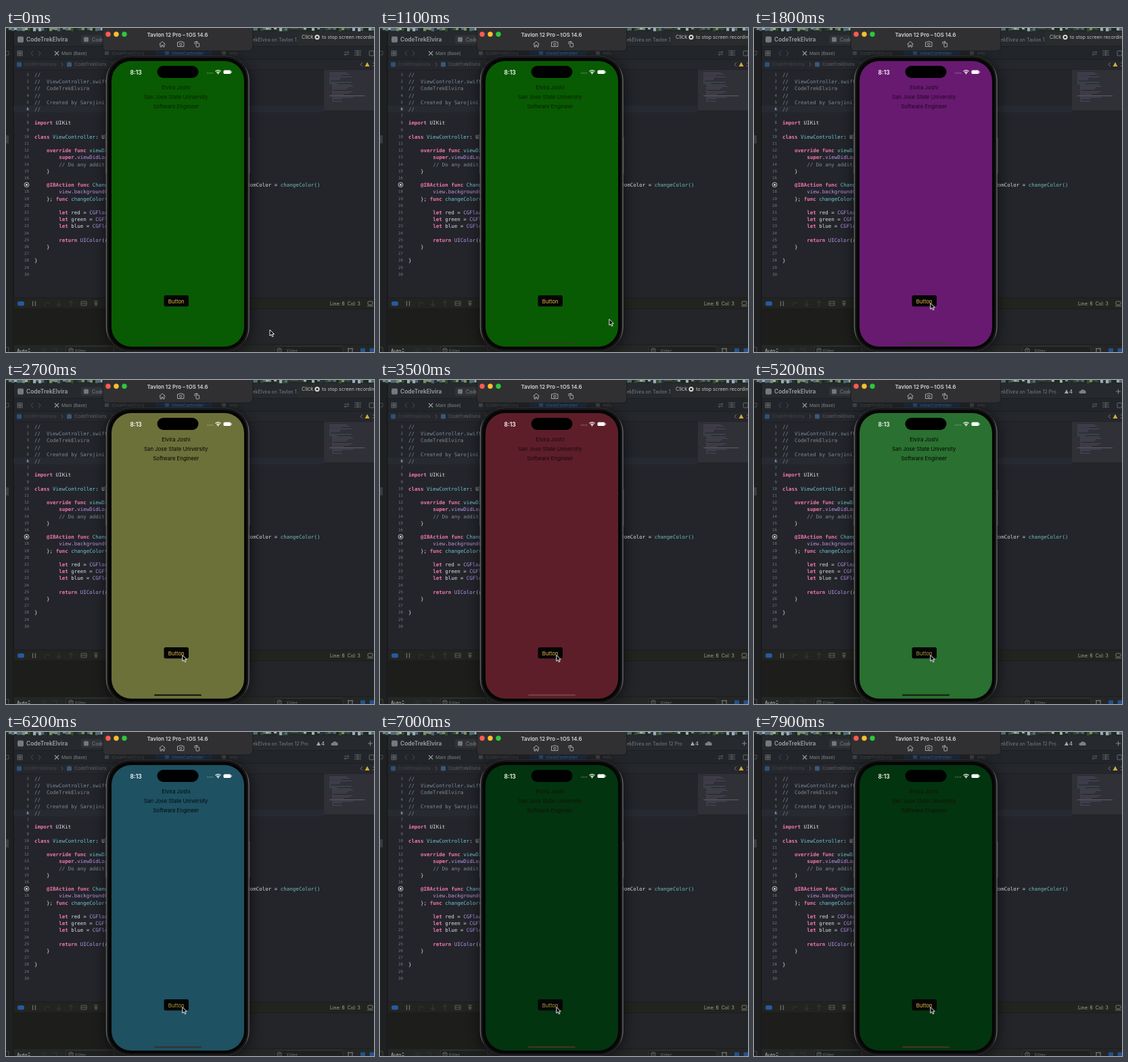
An HTML page that plays this animation: 544 px wide and 480 px high, repeating every 8000 ms.

```html
<!DOCTYPE html>
<html lang="en">
<head>
<meta charset="utf-8">
<style>
html, body { margin: 0; width: 100%; height: 100%; overflow: hidden; background: #222429; }
svg { display: block; width: 544px; height: 480px; }
text { white-space: pre; font-family: Inter, Arial, sans-serif; dominant-baseline: central; }
.code text { font-family: "DejaVu Sans Mono", monospace; font-size: 7.5px; }
.code .num { font-size: 5.8px; }
</style>
</head>
<body>
<svg id="stage" viewBox="0 0 544 480" xmlns="http://www.w3.org/2000/svg">
  <defs>
    <linearGradient id="rim" x2="1" y2="0">
      <stop offset="0" stop-color="#6a6a6c"/><stop offset=".03" stop-color="#2a2a2c"/>
      <stop offset=".97" stop-color="#2a2a2c"/><stop offset="1" stop-color="#6a6a6c"/>
    </linearGradient>
    <filter id="soft" x="-20%" y="-20%" width="140%" height="140%"><feGaussianBlur stdDeviation="10"/></filter>
  </defs>
  <g id="ide"></g>
  <g id="toast"></g>
  <g id="sim"></g>
  <path id="cursor" d="M0 0V9L2.1 7.1L3.6 10.4L5.2 9.7L3.7 6.5H6.5Z" fill="#080808" stroke="#fff" stroke-width=".9"/>
</svg>
<script>
const NS = 'http://www.w3.org/2000/svg';
const $ = id => document.getElementById(id);
const ide = $('ide'), toast = $('toast'), sim = $('sim'), cursor = $('cursor');

function add(parent, tag, attrs, content) {
  const el = document.createElementNS(NS, tag);
  for (const k in attrs) el.setAttribute(k, attrs[k]);
  if (content !== undefined) el.textContent = content;
  parent.appendChild(el);
  return el;
}
const rect = (p, x, y, width, height, fill, rx = 0, more) =>
  add(p, 'rect', { x, y, width, height, fill, rx, ...more });
const label = (p, x, y, size, fill, str, more) =>
  add(p, 'text', { x, y, 'font-size': size, fill, ...more }, str);
const line = (p, d, stroke, width = 1, more) =>
  add(p, 'path', { d, stroke, 'stroke-width': width, fill: 'none', ...more });
const dot = (p, cx, cy, r, fill, more) => add(p, 'circle', { cx, cy, r, fill, ...more });

let seed = 7;
const rnd = () => (seed = (seed * 16807) % 2147483647) / 2147483647;

const PROJECT = 'CodeTrekElvira', DEVICE = 'Tavlon 12 Pro';
const BOLD = { 'font-weight': 600 }, MID = { 'text-anchor': 'middle' }, END = { 'text-anchor': 'end' };

function drawChrome() {
  rect(ide, 0, 0, 544, 480, '#23252b');
  const leaves = ['#344d2a', '#78906b', '#1d2b1c', '#4f6a72', '#9aaeb0', '#27333a'];
  for (let x = 0; x < 544; x += 4) rect(ide, x, 0, 4.2, 2 + rnd() * 3, leaves[rnd() * 6 | 0]);
  rect(ide, 0, 5, 544, 22, '#26292d');
  rect(ide, 0, 27, 544, 20, '#222529');
  rect(ide, 0, 47, 544, 15, '#25272c');
  line(ide, 'M11 27.5H544M11 46.5H544M11 62H544', '#1b1d20', .7);
  rect(ide, 0, 5, 11, 475, '#1e2022');
  line(ide, 'M11 5V480', '#111214', 1);

  rect(ide, 17, 12.5, 9, 9, '#77797d', 2);
  label(ide, 30, 17.1, 8.4, '#a0a2a5', PROJECT, BOLD);
  rect(ide, 111, 10.5, 130, 13, '#303337', 3);
  rect(ide, 115, 13.5, 7, 7, '#75777b', 1.5);
  label(ide, 127, 17.1, 7.2, '#84868a', PROJECT);
  label(ide, 447, 17.1, 7, '#7c7e82', PROJECT + ' on ' + DEVICE, END);
  add(ide, 'path', { d: 'M459 20L462 14L465 20Z', fill: '#a5a7aa' });
  label(ide, 466, 17.1, 7.5, '#a6a8ab', '4', BOLD);
  add(ide, 'path', { d: 'M482 20a2 2 0 0 1 1-4a3 3 0 0 1 5-1a3 3 0 0 1 2 5Z', fill: '#7c7f83' });
  line(ide, 'M535 17H542M538.500 13.500V20.500', '#85878b');

  for (const x of [17, 21]) for (const y of [34, 38]) rect(ide, x, y, 3, 3, 'none', 0, { stroke: '#75777b', 'stroke-width': .8 });
  line(ide, 'M40 34L37 37.500L40 41M48 34L51 37.500L48 41', '#4e5054');
  line(ide, 'M72 34.500L78 40.500M78 34.500L72 40.500', '#96989c', 1.2);
  label(ide, 82, 37.8, 6.7, '#85878b', 'Main (Base)');
  rect(ide, 146, 34, 6, 6, '#3f4246', 1);
  label(ide, 157, 37.8, 6.7, '#44474c', PROJECT);
  rect(ide, 221, 32, 84, 10.5, '#1e2c41', 2);
  rect(ide, 235, 34, 6, 6, '#2c4c76', 1);
  label(ide, 245, 37.8, 6.8, '#396596', 'ViewController');
  rect(ide, 319, 34, 6, 6, '#3f4246', 1);
  label(ide, 330, 37.8, 6.7, '#44474c', 'Info');
  line(ide, 'M500 36H507L505 34M507 39H500L502 41M515 34H525M515 37H525M515 40H525M520 33V41', '#686b6f', .9);
  rect(ide, 537, 34, 7, 7, 'none', 1, { stroke: '#686b6f' });

  [[16, 27], [90, 101]].forEach(([a, b], i) => {
    rect(ide, a, 50.5, 7, 7, i ? '#3a587a' : '#2c527b', 1.5);
    label(ide, b, 54.3, 6.7, i ? '#5f6267' : '#43464b', PROJECT);
    line(ide, `M${b + 55} 51L${b + 57} 54L${b + 55} 57`, '#5c5e62', .8);
  });
  line(ide, 'M527 51L524 54L527 57M542 51L545 54L542 57', '#77797d', .9);
  add(ide, 'path', { d: 'M530.500 57L534 50.500L537.500 57Z', fill: '#d3ab36' });

  // code minimap
  rect(ide, 470, 62, 74, 60, '#2f3137');
  const inks = ['#6b717b', '#6b717b', '#8a4d72', '#59768c', '#755b91'];
  for (let i = 0; i < 22; i++) {
    const w = 6 + rnd() * 28;
    rect(ide, 478 + (i > 8 ? 4 : 0), 66 + i * 2, i % 7 == 6 ? 2 : w, .8, inks[rnd() * 5 | 0], 0, { opacity: .55 });
  }
  rect(ide, 478, 100, 52, .9, '#6a6277');

  // debug bar, console, bottom bar
  rect(ide, 11.5, 400, 533, 16, '#23241f');
  rect(ide, 11.5, 416, 340, 53, '#1d1d1c');
  rect(ide, 350, 416, 194, 53, '#242529');
  rect(ide, 11.5, 469, 533, 11, '#252626');
  line(ide, 'M11 400H544M11 416H544M11 469H544', '#191a19', .8);
  rect(ide, 17, 405, 10, 6.5, '#245aa4', 2.5);
  line(ide, 'M39.500 404.500V412M43.500 404.500V412', '#6c6d6d', 1.3);
  line(ide, 'M57 411Q60 403 64 409M78 404V412M75 409L78 412L81 409M96 412V404M93 407L96 404L99 407', '#3a3b3a');
  line(ide, 'M111 405H119M111 408H119M111 411H119M111 405V411M119 405V411', '#646563', .9);
  line(ide, 'M133 404V412M130 405H136M130 408H136M131 411L133 408L135 411', '#646563', .9);
  label(ide, 479, 408.5, 6.9, '#a5a6a5', 'Line: 6  Col: 3');
  rect(ide, 535, 405, 7, 5, 'none', 1, { stroke: '#777877' });
  line(ide, 'M534 412H543', '#777877');
  label(ide, 16, 478, 7, '#cacaca', 'Auto');
  line(ide, 'M32.500 476.500L34 475L35.500 476.500M32.500 478.500L34 480L35.500 478.500', '#b2b2b2', .8);
  line(ide, 'M52 477.500Q56 473 60 477.500Q56 481 52 477.500M68 475H75V480', '#353636');
  for (const [x, w] of [[89, 70], [397, 101]]) {
    rect(ide, x, 471.5, w, 14, '#1f2020', 3, { stroke: '#3b3c3c', 'stroke-width': .8 });
    dot(ide, x + 7, 477.5, 3.3, 'none', { stroke: '#7b7c7c', 'stroke-width': .8 });
    line(ide, `M${x + 5} 476.500h4m-3 2h2`, '#7b7c7c', .7);
    label(ide, x + (x < 200 ? 13 : 18), 478, 6.8, '#6c6d6d', 'Filter');
  }
  line(ide, 'M505 475H513M506 475V480M512 475V480', '#858686');
  rect(ide, 524, 474.5, 7, 7, '#23518f', 1);
  rect(ide, 537.5, 474.5, 7, 7, '#23518f', 1);
  rect(ide, 0, 159, 4, 12, '#3a3c40');
  line(ide, 'M0 34.500H4V40H0M0 473H4V480', '#55575a', .8);
}

// Each row is [line number, column, colour, text, ...more colour/text pairs].
function drawCode() {
  const g = add(ide, 'g', { class: 'code' });
  const K = '#f277ae', C = '#7e8a97', W = '#dcdee0', T = '#70c6d6', P = '#b994ea', G = '#74bfae';
  const rowY = n => 69 + (n - 1) * 10.2;
  rect(g, 11.5, 115, 458, 10.3, '#272a31');
  for (let n = 1; n <= 30; n++) if (n != 17)
    add(g, 'text', { class: 'num', x: 34, y: rowY(n), fill: n == 6 ? '#d4d6d9' : '#757a81', ...END }, n);
  const rows = [
    [1, 0, C, '//'], [2, 0, C, '//  ViewController.swift'], [3, 0, C, '//  ' + PROJECT], [4, 0, C, '//'],
    [5, 0, C, '//  Created by Sarojini'], [6, 0, C, '//'],
    [8, 0, K, 'import', W, ' UIKit'],
    [10, 0, K, 'class', T, ' ViewController', W, ': UIView'],
    [12, 4, K, 'override func', T, ' viewDidLoad'],
    [13, 8, K, 'super', W, '.', P, 'viewDidLoad'],
    [14, 8, C, '// Do any additional'], [15, 4, W, '}'],
    [17, 4, K, '@IBAction func', T, ' Change'],
    [18, 8, P, 'view.backgroundColor'], [19, 4, W, '}; ', K, 'func', T, ' changeColor()'],
    [21, 8, K, 'let', W, ' red = ', P, 'CGFloat'], [22, 8, K, 'let', W, ' green = ', P, 'CGFloat'],
    [23, 8, K, 'let', W, ' blue = ', P, 'CGFloat'],
    [25, 8, K, 'return', P, ' UIColor', W, '(red'], [26, 4, W, '}'], [28, 0, W, '}'],
    [17, 69.5, W, 'domColor = ', G, 'changeColor()']
  ];
  for (const [n, col, ...runs] of rows) {
    const t = add(g, 'text', { x: 42 + col * 4.52, y: rowY(n) });
    for (let i = 0; i < runs.length; i += 2)
      add(t, 'tspan', { fill: runs[i], 'font-weight': runs[i] == K ? 700 : 400 }, runs[i + 1]);
  }
  dot(g, 30.5, 232.2, 3.4, 'none', { stroke: '#d5d7da', 'stroke-width': .9 });
  dot(g, 30.5, 232.2, 1.5, '#d5d7da');
}

function drawToast() {
  rect(toast, 430, 5, 120, 20, '#2a2b2d', 3);
  label(toast, 437, 13.6, 7.4, '#c2c3c4', 'Click');
  dot(toast, 460, 13.6, 3.6, '#dedede');
  rect(toast, 458.5, 12.1, 3, 3, '#2a2b2d');
  label(toast, 467, 13.6, 7.1, '#c2c3c4', 'to stop screen recording');
}

function drawPhone() {
  rect(sim, 148, 44, 212, 438, '#000', 36, { opacity: .6, filter: 'url(#soft)' });
  rect(sim, 143, -8, 222, 42, '#303032', 6, { stroke: '#151516', 'stroke-width': .8 });
  ['#fb5b52', '#fbbd2e', '#2ac840'].forEach((c, i) => dot(sim, 151 + i * 12, 9.3, 3.7, c));
  label(sim, 253.5, 9.5, 7.9, '#d6d6d7', DEVICE + ' – tOS 14.6', { ...BOLD, ...MID });
  const ic = '#b4b4b6';
  line(sim, 'M226.500 24L231 20L235.500 24M228 23V28H230V25.500H232V28H234V23', ic, .9);
  line(sim, 'M253.500 21H256L257 20H260L261 21H263V27.500H253.500Z', ic, .9);
  dot(sim, 258.3, 24.2, 1.7, 'none', { stroke: ic, 'stroke-width': .9 });
  rect(sim, 281, 22.5, 4.6, 5.5, 'none', .6, { stroke: ic, 'stroke-width': .9 });
  line(sim, 'M279 24V20.500H283M281.500 19L283 20.500L281.500 22', ic, .9);

  rect(sim, 146.8, 156, 2, 26, '#3a3a3d', 1);
  rect(sim, 146.8, 190, 2, 26, '#3a3a3d', 1);
  rect(sim, 358.7, 162, 2, 54, '#3a3a3d', 1);
  rect(sim, 148.5, 41.5, 210.500, 437.500, '#060606', 36, { stroke: 'url(#rim)', 'stroke-width': 1.4 });
  rect(sim, 150.5, 43.5, 206.500, 433.500, 'none', 34, { stroke: '#232325', 'stroke-width': 1 });
  const screen = rect(sim, 156, 49, 196, 423, '#000', 29);
  rect(sim, 223.5, 56, 61, 18, '#000', 9);
  label(sim, 183.5, 65.5, 8.5, '#fff', '8:13', BOLD);
  for (let i = 0; i < 4; i++) dot(sim, 298 + i * 2.5, 66.8, .65, '#fff', { opacity: .65 });
  line(sim, 'M309.500 64.200Q313.500 61 317.500 64.200M311.200 66Q313.500 64.100 315.800 66', '#fff', 1.3);
  dot(sim, 313.5, 67.3, 1.1, '#fff');
  rect(sim, 321.5, 62.5, 11, 5.6, '#fff', 1.6);
  rect(sim, 333.2, 64.3, .9, 2, '#fff', .4);
  const labels = ['Elvira Joshi', 'San Jose State University', 'Software Engineer']
    .map((s, i) => label(sim, 251.3, 87.6 + i * 14.4, 7.8, '#000', s, MID));
  rect(sim, 233.5, 396, 36.5, 16.6, '#050505', 2.5);
  const button = label(sim, 251.7, 404.7, 7.8, '#e2ba45', 'Button', MID);
  const bar = rect(sim, 219, 465.8, 70, 2, '#000', 1);
  return { screen, labels, button, bar };
}

drawChrome();
drawCode();
drawToast();
const ui = drawPhone();

// start, screen colour, label colour, home bar colour
const scenes = [
  [0, '#085b02', '#0e1f06', '#2a4415'],
  [1800, '#681a70', '#1c0820', '#3c3a34'],
  [2700, '#6c713a', '#050505', '#111208'],
  [3300, '#5d1e2a', '#180a0c', '#75434b'],
  [4800, '#2a7030', '#050805', '#101c12'],
  [5400, '#1e5161', '#040b0e', '#3c2c2c'],
  [7000, '#02340f', '#180f0c', '#4d3423']
];
const presses = [4800, 5200, 5400, 6200, 7000];
const PRESS_MS = 200, LOOP = 8000, TOAST_END = 4200;
const ease = u => u * u * (3 - 2 * u);
const clamp = u => Math.max(0, Math.min(1, u));

function render(t) {
  const [, bg, ink, home] = scenes.filter(s => s[0] <= t).pop();
  ui.screen.setAttribute('fill', bg);
  ui.labels.forEach(l => l.setAttribute('fill', ink));
  ui.bar.setAttribute('fill', home);
  const pressed = presses.some(p => t >= p && t < p + PRESS_MS);
  ui.button.setAttribute('fill', pressed ? '#a99a3c' : '#e2ba45');
  const u = ease(clamp((t - 800) / 700));
  cursor.setAttribute('transform', `translate(${390 - 129.2 * u} ${447 - 39.5 * u})`);
  toast.setAttribute('opacity', 1 - clamp((t - TOAST_END) / 300));
}

function tick(now) {
  render(now % LOOP);
  requestAnimationFrame(tick);
}
render(0);
requestAnimationFrame(tick);
</script>
</body>
</html>
```
